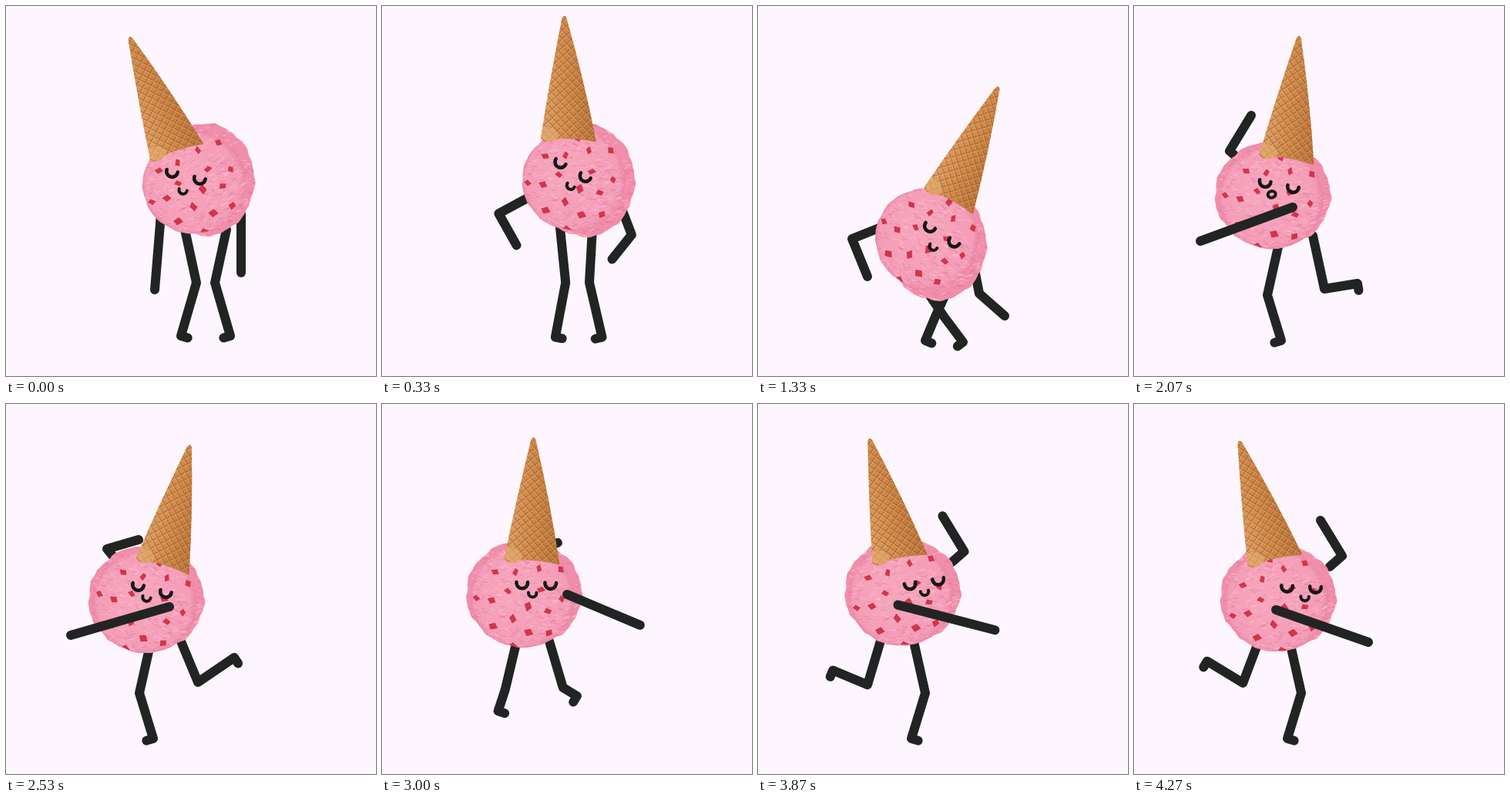
Recreate the animation shown at these times as an HTML page with a canvas. Size 480 px wide and 480 px high, loop 4.34 s.

```html
<!DOCTYPE html>
<html lang="en">
<head>
<meta charset="utf-8">
<title>Dancing ice cream</title>
<style>
html, body { margin: 0; width: 100%; height: 100%; overflow: hidden; background: #fdf6fe; }
canvas { display: block; width: 480px; height: 480px; }
</style>
</head>
<body>
<canvas id="stage" width="480" height="480"></canvas>
<script>
const ctx = document.getElementById('stage').getContext('2d');
const LOOP = 4340, STEP = 200 / 3, TAU = Math.PI * 2, RAD = Math.PI / 180;
const INK = '#222423', AXIS = 195;

const lerp = (a, b, k) => a + (b - a) * k;
const line = (x, y, x2, y2) => [x, y, (x + x2) / 2, (y + y2) / 2, x2, y2];
const flip = (limb, axis) => limb.map((v, i) => i % 2 ? v : 2 * axis - v);

function rotate(x, y, degrees) {
  const c = Math.cos(degrees * RAD), s = Math.sin(degrees * RAD);
  return [x * c - y * s, x * s + y * c];
}

// Arms swing: each bone turns the short way round instead of shrinking
function swing(a, b, k) {
  const out = [lerp(a[0], b[0], k), lerp(a[1], b[1], k)];
  for (let i = 2; i < 6; i += 2) {
    const ax = a[i] - a[i - 2], ay = a[i + 1] - a[i - 1];
    const bx = b[i] - b[i - 2], by = b[i + 1] - b[i - 1];
    const from = Math.atan2(ay, ax);
    const delta = Math.atan2(ax * by - ay * bx, ax * bx + ay * by);
    const len = lerp(Math.hypot(ax, ay), Math.hypot(bx, by), k), angle = from + delta * k;
    out.push(out[i - 2] + len * Math.cos(angle), out[i - 1] + len * Math.sin(angle));
  }
  return out;
}

function mix(a, b, k) {
  const out = {};
  for (const part in a) {
    out[part] = part.startsWith('arm') ? swing(a[part], b[part], k)
      : a[part].map((v, i) => lerp(v, b[part][i], k));
  }
  return out;
}

// Moves and leans the body while the feet stay planted
function shift(pose, dx, dy, turn) {
  const [x, y, cx, cy, tilt] = pose.body, [fx, fy, ft, slide] = pose.face;
  const [ox, oy] = rotate(cx - x, cy - y, turn), [ex, ey] = rotate(fx - x, fy - y, turn);
  const nx = x + dx, ny = y + dy;
  const arm = a => a.map((v, i) => v + (i % 2 ? dy : dx));
  const leg = l => l.map((v, i) => v + (i % 2 ? dy : dx) * (1 - (i >> 1) / 2));
  return {
    ...pose,
    body: [nx, ny, nx + ox, ny + oy, tilt + turn],
    face: [nx + ex, ny + ey, ft + turn, slide],
    armL: arm(pose.armL), armR: arm(pose.armR), legL: leg(pose.legL), legR: leg(pose.legR)
  };
}

function mirror(pose) {
  return {
    ...pose, view: [1, 1],
    armL: flip(pose.armR, AXIS), armR: flip(pose.armL, AXIS),
    legL: flip(pose.legR, AXIS), legR: flip(pose.legL, AXIS)
  };
}

// Same leg on both sides of an axis
const pair = (axis, leg) => ({ legL: leg, legR: flip(leg, axis) });

// view: side-on amount, facing; body: ball x, y, cone base x, y, tilt
// face: centre x, y, tilt, mouth slide; limbs: three joints
const hang = {
  view: [0, 0], body: [244, 230, 222, 190, -22.4], face: [233, 221, 14, 1],
  armL: line(201, 270, 193, 368), armR: line(305, 270, 305, 346),
  ...pair(259, [232, 290, 247, 359, 227, 428])
};
const akimbo = {
  view: [0, 0], body: [263, 299, 258, 237, 2], face: [269, 284, 26, 17],
  armL: [197, 290, 162, 250, 205, 261], armR: [325, 328, 354, 353, 310, 352],
  ...pair(250, [237, 362, 230, 398, 222, 432])
};
const lean = {
  view: [0, 0], body: [219, 302, 247, 253, 23.6], face: [238, 297, 32, -1],
  armL: [162, 286, 122, 302, 142, 351], armR: [281, 342, 287, 373, 320, 402],
  legL: [245, 370, 230, 403, 217, 434], legR: [219, 370, 242, 404, 266, 436]
};
const leftUp = {
  view: [1, -1], body: [178, 250, 198, 200, 5.7], face: [188, 233, 11, -7],
  armL: [140, 202, 124, 188, 152, 142], armR: line(206, 261, 86, 305),
  legL: [188, 308, 173, 375, 191, 434], legR: [232, 298, 247, 367, 290, 360]
};
const leftDown = {
  ...leftUp,
  body: [180, 258, 203, 211, 12.7], face: [189, 241, 14, -4],
  armL: [145, 205, 131, 188, 172, 176], armR: line(212, 263, 84, 300),
  legR: [227, 308, 249, 361, 296, 329]
};
const leftBob = k => mix(leftUp, leftDown, k);
const rightUp = {
  ...mirror(leftBob(0.25)),
  body: [186, 244, 185, 201, -12.8], face: [215, 228, -15, -5],
  armL: line(180, 257, 309, 284), armR: flip(leftUp.armL, AXIS)
};
const rightDown = {
  ...mirror(leftBob(0.85)),
  body: [185, 256, 183, 203, -16.7], face: [217, 239, 2, 5],
  armL: line(184, 267, 304, 309), armR: shift(rightUp, 4, 9, 0).armR
};

const stretch = shift(mix(hang, akimbo, 0.3), 0, -38, 15);
const sway = shift(akimbo, -18, -12, -13);
const sweepLeft = { ...mix(lean, leftUp, 0.5), armL: line(145, 245, 46, 250) };
const sweepRight = { ...mix(leftDown, rightUp, 0.5), armR: flip(sweepLeft.armL, AXIS) };

const keys = [
  [0, hang], [4, stretch], [8, sway], [11, akimbo], [12, akimbo], [20, lean],
  [25, sweepLeft], [31, leftUp], [35, leftBob(1.15)], [38, leftDown], [41, leftUp],
  [46, sweepRight], [51, rightUp], [55, rightDown], [60, rightUp], [64, rightDown]
];

function poseAt(n) {
  const i = Math.max(1, keys.findIndex(([step]) => step >= n));
  const [from, a] = keys[i - 1], [to, b] = keys[i];
  const k = (n - from) / (to - from);
  return mix(a, b, lerp(k, (1 - Math.cos(Math.PI * k)) / 2, 0.7));
}

function seeded(seed) {
  return () => (seed = (seed * 16807) % 2147483647) / 2147483647;
}

const rnd = seeded(41);
const grains = Array.from({ length: 330 }, () => {
  const a = rnd() * TAU, r = Math.sqrt(rnd()) * 65;
  return { x: r * Math.cos(a), y: r * Math.sin(a), len: 2 + rnd() * 6, turn: rnd() * 1.2 - 0.6, light: rnd() < 0.55 };
});
// Golden-angle spiral keeps the fruit evenly scattered
const fruit = Array.from({ length: 17 }, (_, i) => {
  const a = i * 2.4 + 0.9 + rnd() * 0.3, r = 64 * Math.sqrt((i + 0.8) / 17);
  return { x: r * Math.cos(a), y: r * Math.sin(a), w: 4 + rnd() * 2, h: 3 + rnd() * 1.5, turn: rnd() * TAU };
});

function drawLimb(p, toeSide) {
  ctx.beginPath();
  for (let i = 0; i < 6; i += 2) ctx.lineTo(p[i], p[i + 1]);
  if (toeSide) {
    const dx = p[4] - p[2], dy = p[5] - p[3], k = toeSide * 9 / Math.hypot(dx, dy);
    ctx.lineTo(p[4] - dy * k, p[5] + dx * k);
  }
  ctx.lineWidth = 12;
  ctx.strokeStyle = INK;
  ctx.stroke();
}

function blob(rx, ry, rough) {
  ctx.beginPath();
  for (let i = 0; i < 120; i++) {
    const a = i / 120 * TAU;
    const r = 1 + rough * (Math.sin(a * 9 + 1) + Math.sin(a * 17) * 0.7 + Math.sin(a * 31) * 0.5);
    ctx.lineTo(rx * r * Math.cos(a), ry * r * Math.sin(a));
  }
  ctx.closePath();
}

function drawGrains() {
  ctx.lineWidth = 1.3;
  for (const g of grains) {
    const dx = Math.cos(g.turn) * g.len / 2, dy = Math.sin(g.turn) * g.len / 2;
    ctx.strokeStyle = g.light ? 'rgba(255,192,209,.55)' : 'rgba(216,105,138,.34)';
    ctx.beginPath();
    ctx.moveTo(g.x - dx, g.y - dy);
    ctx.lineTo(g.x + dx, g.y + dy);
    ctx.stroke();
  }
}

function drawFruit() {
  ctx.fillStyle = '#d1354b';
  for (const f of fruit) {
    ctx.save();
    ctx.translate(f.x, f.y);
    ctx.rotate(f.turn);
    ctx.beginPath();
    ctx.moveTo(-f.w, 1 - f.h);
    ctx.lineTo(f.w - 2, -f.h);
    ctx.lineTo(f.w, f.h - 1);
    ctx.lineTo(3 - f.w, f.h);
    ctx.fill();
    ctx.restore();
  }
}

function drawScoop([x, y, , , tilt], side) {
  const [ox, oy] = rotate(15, 1, tilt);
  ctx.save();
  ctx.translate(x + lerp(ox, 2, side), y + lerp(oy, -5, side));
  blob(lerp(64, 75, side), lerp(73, 69, side), 0.011);
  ctx.fillStyle = '#f08eab';
  ctx.fill();
  ctx.clip();
  ctx.scale(1.15, 1.15);
  drawGrains();
  ctx.restore();

  ctx.save();
  ctx.translate(x, y);
  ctx.rotate(tilt * RAD);
  blob(67, 65, 0.006);
  const g = ctx.createRadialGradient(-12, -10, 15, 0, 0, 69);
  g.addColorStop(0, '#f6a5bd');
  g.addColorStop(0.85, '#f49db8');
  g.addColorStop(1, '#e680a0');
  ctx.fillStyle = g;
  ctx.fill();
  ctx.clip();
  drawGrains();
  drawFruit();
  ctx.restore();
}

function drawCone([, , x, y, tilt]) {
  ctx.save();
  ctx.translate(x, y);
  ctx.rotate(tilt * RAD);
  ctx.beginPath();
  ctx.moveTo(-36, -4);
  ctx.quadraticCurveTo(-22, -78, -3, -159);
  ctx.quadraticCurveTo(0, -165, 3, -159);
  ctx.quadraticCurveTo(23, -78, 36, 3);
  ctx.quadraticCurveTo(0, -5, -18, -2);
  ctx.quadraticCurveTo(-28, 5, -36, -4);
  const g = ctx.createLinearGradient(-34, 0, 34, 0);
  g.addColorStop(0, '#dda066');
  g.addColorStop(0.45, '#d08a4a');
  g.addColorStop(1, '#b87238');
  ctx.fillStyle = g;
  ctx.fill();
  ctx.clip();
  const grid = (color, offset) => {
    ctx.strokeStyle = color;
    ctx.beginPath();
    for (let v = 100; v > -220; v -= 11) {
      ctx.moveTo(-45, v + offset);
      ctx.lineTo(45, v - 75 + offset);
      ctx.moveTo(45, v + offset);
      ctx.lineTo(-45, v - 105 + offset);
    }
    ctx.stroke();
  };
  ctx.lineWidth = 1.4;
  grid('rgba(150,84,36,.5)', 0);
  ctx.lineWidth = 1;
  grid('rgba(238,184,124,.45)', 2);
  ctx.fillStyle = 'rgba(230,174,114,.6)';
  ctx.beginPath();
  ctx.ellipse(-25, -9, 13, 9, 0.5, 0, TAU);
  ctx.fill();
  ctx.restore();
}

function drawFace([x, y, tilt, slide], side, singing) {
  const arc = (ax, ay, r) => {
    ctx.beginPath();
    ctx.arc(ax, ay, r, -0.1, Math.PI + 0.1);
    ctx.stroke();
  };
  ctx.save();
  ctx.translate(x, y);
  ctx.rotate(tilt * RAD);
  ctx.strokeStyle = '#171717';
  ctx.lineWidth = 4.6;
  arc(-18.5, -2, 7.3);
  arc(18.5, -2, 7.3);
  ctx.translate(slide, lerp(20, 13, side));
  ctx.lineWidth = 4;
  if (singing) {
    ctx.beginPath();
    ctx.ellipse(0, 0, 5, 4.2, -0.5, 0, TAU);
    ctx.stroke();
  } else {
    arc(0, -2, 5.2);
  }
  ctx.restore();
}

function draw(n) {
  const p = poseAt(n), [side, facing] = p.view;
  const frontR = n >= 23 && n < 46, frontL = n >= 46;
  const singing = (n >= 6 && n < 16) || (n >= 27 && n < 35) || (n >= 46 && n < 55);
  ctx.fillStyle = '#fdf6fe';
  ctx.fillRect(0, 0, 480, 480);
  ctx.lineCap = ctx.lineJoin = 'round';
  drawLimb(p.legL, facing < -0.5 ? 1 : -1);
  drawLimb(p.legR, facing > 0.5 ? -1 : 1);
  if (!frontL) drawLimb(p.armL);
  if (!frontR) drawLimb(p.armR);
  drawScoop(p.body, side);
  drawCone(p.body);
  drawFace(p.face, side, singing);
  if (frontL) drawLimb(p.armL);
  if (frontR) drawLimb(p.armR);
}

// Steps fall on hundredths of a second
function stepAt(t) {
  const n = Math.floor(t / STEP + 0.1);
  return Math.min(64, Math.round(n * STEP / 10) * 10 > t ? n - 1 : n);
}

const start = performance.now();
let shown = -1;
function tick() {
  const n = stepAt((performance.now() - start) % LOOP);
  if (n !== shown) draw(shown = n);
  requestAnimationFrame(tick);
}
tick();
</script>
</body>
</html>
```
